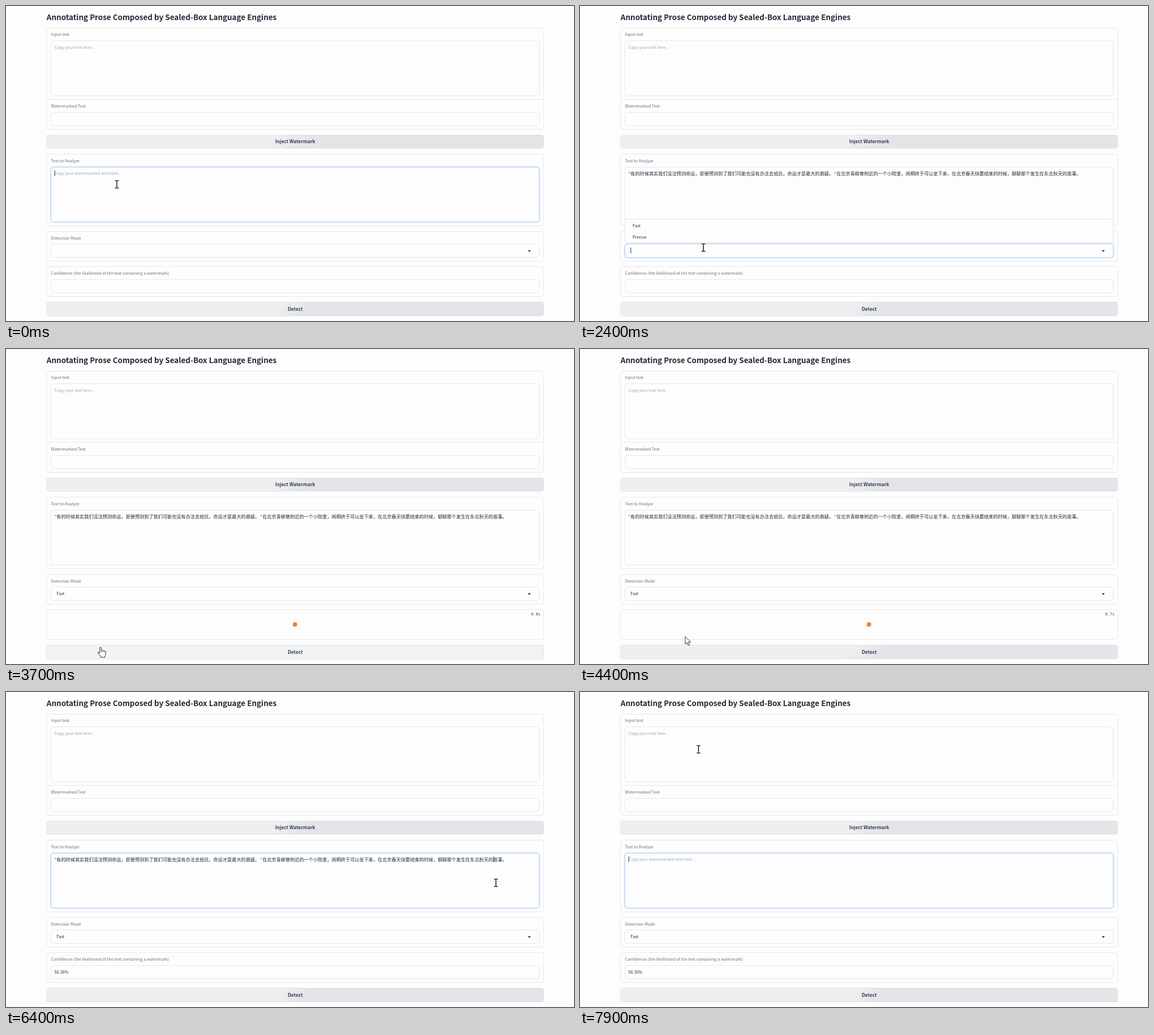
Recreate the animation shown at these times as an HTML page with a canvas. Size 1004x558 px, loop 8 s.

```html
<!DOCTYPE html>
<html lang="zh-Hans">
<head>
<meta charset="utf-8">
<title>Demo form</title>
<style>
  html, body { margin: 0; width: 100%; height: 100%; overflow: hidden; background: #fdfdfd; }
  canvas { display: block; width: 1004px; height: 558px; }
</style>
</head>
<body>
<canvas id="stage"></canvas>
<script>
const W = 1004, H = 558, LOOP = 8000, STEP = 100;
const SANS = '"Noto Sans CJK SC", "Noto Sans CJK JP", "Open Sans", sans-serif';
const QUOTE = '"Noto Sans CJK KR", "Open Sans", sans-serif';
const MONO = '"Noto Sans Mono", "DejaVu Sans Mono", monospace';
const LINE = '#e6e7eb', LABEL = '#6b7280', HINT = '#a0a6b0', INK = '#1f2937';
const SMALL = 7.28, HAN = 8.16;

const canvas = document.getElementById('stage');
const ctx = canvas.getContext('2d');
const dpr = window.devicePixelRatio || 1;
canvas.width = W * dpr;
canvas.height = H * dpr;

// Moments of the interaction, in ms
const PASTE = 1200, OPEN = 2100, PICK = 2900, RUN = 3700, DONE = 4800;
const REFOCUS = 6300, SELECT = 6800, ERASE = 7400;

// Pointer stops: time, x, y
const route = [
  [0, 196, 316], [1300, 196, 316], [1800, 231.5, 418], [2000, 228, 435],
  [2300, 228, 435], [2700, 165, 390], [3000, 165, 390], [3500, 167, 528],
  [4100, 167, 528], [4700, 205, 491], [5300, 225.5, 489.5], [5600, 225.5, 489.5],
  [6300, 866, 338], [6600, 866, 338], [7000, 870, 331], [7300, 870, 331],
  [7900, 209.5, 101.5], [8000, 209.5, 101.5]
];

const clamp = v => Math.min(1, Math.max(0, v));
const ease = p => p * p * (3 - 2 * p);
const within = (v, a, b) => v >= a && v < b;

function pointerAt(t) {
  const i = Math.max(1, route.findIndex(stop => stop[0] > t));
  const [t0, x0, y0] = route[i - 1], [t1, x1, y1] = route[i];
  const p = ease((t - t0) / (t1 - t0));
  return { x: x0 + (x1 - x0) * p, y: y0 + (y1 - y0) * p };
}

function text(str, x, y, { size = SMALL, color = LABEL, weight = 400, align = 'left', family = SANS } = {}) {
  ctx.font = `${weight} ${size}px ${family}`;
  ctx.textAlign = align;
  ctx.fillStyle = color;
  ctx.fillText(str, x, y);
}

function box(x, y, r, b, { radius = 4.5, fill = '#fdfdfd', stroke = LINE, width = 1 } = {}) {
  ctx.beginPath();
  ctx.roundRect(x, y, r - x, b - y, radius);
  if (fill) {
    ctx.fillStyle = fill;
    ctx.fill();
  }
  ctx.strokeStyle = stroke;
  ctx.lineWidth = width;
  ctx.stroke();
}

const panel = (top, bottom) => box(71.5, top, 950.5, bottom);

function field(top, bottom, focused) {
  if (focused) box(79.5, top, 942.5, bottom, { stroke: '#e2eefc', width: 4 });
  box(79.5, top, 942.5, bottom, { stroke: focused ? '#b2d0f3' : LINE });
}

function button(top, bottom, label, hover) {
  const fill = ctx.createLinearGradient(490, top, 515, bottom);
  fill.addColorStop(0, hover ? '#f2f3f4' : '#eeeff1');
  fill.addColorStop(1, hover ? '#f0f2f3' : '#e3e5e8');
  box(71.5, top, 950.5, bottom, { fill, stroke: '#e1e3e7' });
  text(label, 511.2, (top + bottom) / 2 + 3.2, { size: 8.32, weight: 600, color: '#374151', align: 'center' });
}

function caret(x, y, t, start) {
  if ((t - start) % 1000 >= 500) return;
  ctx.fillStyle = '#222';
  ctx.fillRect(x, y, 0.9, 10.5);
}

function passage(color) {
  const han = { size: HAN, color }, mark = { color, family: QUOTE };
  text('“', 85.8, 299.6, mark);
  text('有的时候其实我们没法预测命运，即便预测到了我们可能也没有办法去抵抗，命运才是最大的悬疑。', 89.3, 299.6, han);
  text('”', 449.3, 299.6, mark);
  text('在北京青柳巷附近的一个小院里，闻桐终于可以坐下来，在北京春天快要结束的时候，聊聊那个发生在东北秋天的故事。', 453.2, 299.6, han);
}

function analyzer(t) {
  panel(262.5, 389.5);
  text('Text to Analyze', 79.5, 276.6);
  field(285.5, 382.5, t < OPEN || t >= REFOCUS);
  const selected = within(t, SELECT, ERASE);
  if (within(t, PASTE, ERASE)) {
    if (selected) {
      ctx.fillStyle = '#0078d7';
      ctx.fillRect(85.5, 290.5, 801, 11.5);
    }
    passage(selected ? '#fff' : INK);
  } else {
    text('Copy your watermarked text here...', 85.6, 299.4, { color: HINT });
  }
  if (t < PASTE) caret(85.6, 291, t, -200);
  else if (t < OPEN) caret(886, 291, t, PASTE);
  else if (within(t, REFOCUS, SELECT)) caret(861.5, 291, t, REFOCUS);
  else if (t >= ERASE) caret(85.6, 291, t, 7500);
}

function mode(t) {
  panel(399.5, 452);
  text('Detection Mode', 79.5, 413.7);
  field(421.5, 445.5, within(t, OPEN, RUN - 100));
  if (t >= PICK) text('Fast', 89.4, 435.8, { color: INK });
  if (within(t, OPEN, PICK)) caret(89.4, 428, t, OPEN);
  else if (within(t, PICK, RUN - 100)) caret(103.2, 428, t, PICK);
  ctx.fillStyle = '#111827';
  ctx.beginPath();
  ctx.moveTo(922.3, 432.7);
  ctx.lineTo(927.7, 432.7);
  ctx.lineTo(925, 435.5);
  ctx.fill();
}

function options(t) {
  const shown = t < PICK ? clamp((t - OPEN) / 200) : clamp((PICK + 120 - t) / 120);
  if (t < OPEN || !shown) return;
  ctx.save();
  ctx.globalAlpha = shown;
  ctx.translate(0, 3 * (1 - shown));
  if (t < PICK) {
    box(79.5, 377.5, 942.5, 419.5, { stroke: '#e2e4e8' });
    if (pointerAt(t).y < 398) {
      ctx.fillStyle = '#f1f2f4';
      ctx.fillRect(80, 379, 862, 19.5);
    }
    text('Precise', 93, 411.5, { color: INK });
  }
  text('Fast', 93, 392, { color: t < PICK ? INK : LABEL });
  ctx.restore();
}

function result(t) {
  panel(461.5, 514.5);
  if (within(t, RUN, DONE)) {
    text(((t - RUN) / 1000).toFixed(1) + 's', 945, 471.6, { size: 7, align: 'right', family: MONO, color: '#4b5563' });
    ctx.fillStyle = '#f0833a';
    ctx.beginPath();
    ctx.arc(510.7, 488, 4, 0, 7);
    ctx.fill();
    return;
  }
  text('Confidence (the likelihood of the text containing a watermark)', 79.5, 476.2);
  field(484.5, 508);
  if (t >= DONE) text('56.36%', 85.6, 498.6, { color: INK });
}

const arrowShape = new Path2D('M0 0V13.4L3.1 10.5L5.3 15.6L7.5 14.7L5.3 9.7H9.8Z');
const handShape = new Path2D('M-1.2 1Q0 -.8 1.4 1V6.2Q2.6 4.9 3.9 6.5Q5.4 5.3 6.6 7Q8.6 6.2 9.2 8.2V12' +
  'Q9 14.5 7.8 15.8V18H.3V16.2L-4.4 10.8Q-5 9 -3 9.2L-1.2 10.8Z');
const beamShape = new Path2D('M-3.4 -6.6H-1Q0 -6.6 0 -5.6Q0 -6.6 1 -6.6H3.4M0 -5.8V5.8M-3.4 6.6H-1Q0 6.6 0 5.6Q0 6.6 1 6.6H3.4');

function pointer(t, { x, y }) {
  const inField = within(x, 80, 943) &&
    (within(y, 61, 160) || within(y, 188, 213) || within(y, 285, 383) || within(y, 422, 446));
  const onOption = within(t, OPEN + 200, PICK + 200) && within(y, 377, 420);
  const hand = onOption || within(y, 524, 550) || within(y, 228, 253);
  ctx.save();
  ctx.translate(x, y);
  ctx.lineJoin = 'round';
  if (inField && !hand) {
    ctx.strokeStyle = '#111';
    ctx.lineWidth = 1.4;
    ctx.stroke(beamShape);
  } else {
    const shape = hand ? handShape : arrowShape;
    ctx.fillStyle = '#fff';
    ctx.strokeStyle = '#2b2b36';
    ctx.lineWidth = 1;
    ctx.fill(shape);
    ctx.stroke(shape);
    if (hand) {
      ctx.lineWidth = 0.7;
      ctx.stroke(new Path2D('M1.4 6V9M3.9 6.5V9.3M6.5 7V9.6'));
    }
  }
  ctx.restore();
}

function draw(t) {
  const mouse = pointerAt(t);
  ctx.setTransform(dpr, 0, 0, dpr, 0, 0);
  ctx.fillStyle = '#fdfdfd';
  ctx.fillRect(0, 0, W, H);

  text('Annotating Prose Composed by Sealed-Box Language Engines', 71.8, 24.5, { size: 13.45, weight: 600, color: INK });

  panel(39.5, 218.5);
  ctx.fillStyle = LINE;
  ctx.fillRect(72, 165, 878, 1);
  text('Input text', 79.5, 53.3);
  field(61.5, 159);
  text('Copy your text here...', 85.6, 75.5, { color: HINT });
  text('Watermarked Text', 79.5, 179.6);
  field(188.5, 212);
  button(228.5, 252, 'Inject Watermark', within(mouse.y, 228, 253));

  analyzer(t);
  mode(t);
  result(t);
  button(524.5, 549, 'Detect', within(mouse.y, 524, 550));
  options(t);
  pointer(t, mouse);
}

const begin = performance.now();
function tick() {
  const t = (performance.now() - begin) % LOOP;
  draw(Math.floor(t / STEP) * STEP);
  requestAnimationFrame(tick);
}
tick();
</script>
</body>
</html>
```
